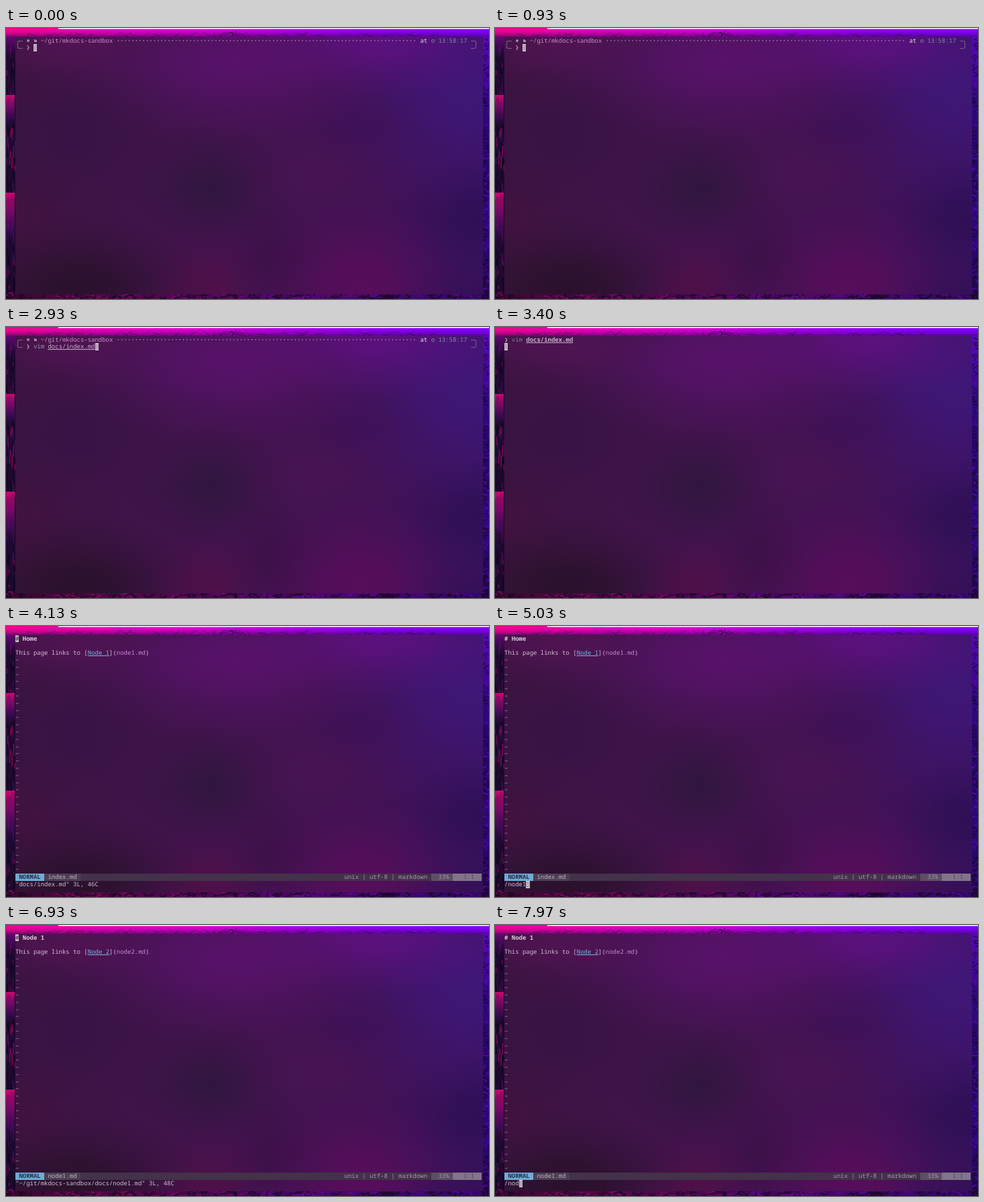
An HTML page with a canvas for the animation above (8 s loop, 720x405 px).

```html
<!DOCTYPE html>
<html lang="en">
<head>
<meta charset="utf-8">
<title>Terminal session</title>
<style>
  html, body { margin: 0; width: 100%; height: 100%; overflow: hidden; background: #1a0826; }
  canvas { position: absolute; left: 0; top: 0; }
  #term {
    position: absolute; left: 14px; top: 13.6px; width: 697px; height: 384px;
    font: 500 8.98px/10.8px "Noto Sans Mono", "DejaVu Sans Mono", monospace;
    text-rendering: geometricPrecision; font-variant-ligatures: none;
    color: #d0bfd1;
  }
  #term span { position: absolute; white-space: pre; height: 10.8px; }
  #term .bold { font-weight: 700; }
  #term .under { text-decoration: underline; text-underline-offset: 1px; text-decoration-thickness: 0.7px; text-decoration-skip-ink: none; }
  #term .bracket { box-sizing: border-box; height: 12px; border: 1px solid #75608a; }
  #term .open { border-right: 0; border-radius: 3px 0 0 3px; }
  #term .close { border-left: 0; border-radius: 0 3px 3px 0; }
  #term .cursor { background: #cfc3cf; color: #3a1740; }
  #term .empty::after { content: ""; position: absolute; inset: 2px 1px; border: 1px dotted #6b4a70; }
  #term .icon { background: #a088a8; }
</style>
</head>
<body>
<canvas id="wall" width="720" height="405"></canvas>
<div id="term"></div>
<script>
const LOOP = 8000, CELL = 5.388, ROW = 10.8;

// ---- wallpaper and blurred window ----
const ctx = document.getElementById('wall').getContext('2d');
let seed = 11;
const rnd = (lo = 0, hi = 1) => {
  seed = (seed * 16807) % 2147483647;
  return lo + (hi - lo) * seed / 2147483647;
};
const pick = list => list[Math.floor(rnd(0, list.length))];

function fill(color, x, y, w, h) {
  ctx.fillStyle = color;
  ctx.fillRect(x, y, w, h);
}

function gradient(x0, y0, x1, y1, colors) {
  const g = ctx.createLinearGradient(x0, y0, x1, y1);
  colors.forEach((c, i) => g.addColorStop(i / (colors.length - 1), c));
  return g;
}

function curl(x, y, r, color, width) {
  const start = rnd(0, 6.28);
  ctx.strokeStyle = color;
  ctx.lineWidth = width;
  ctx.beginPath();
  ctx.ellipse(x, y, r * rnd(0.8, 2), r * rnd(0.4, 1), rnd(-0.5, 0.5), start, start + rnd(1.5, 5));
  ctx.stroke();
}

function drawTop() {
  fill(gradient(0, 0, 720, 0, ['#f00590', '#e400b8', '#d800d0', '#a800e4', '#8a00f4', '#8000ff']), 0, 0, 720, 14);
  fill(gradient(0, 4, 0, 14, ['rgba(60,6,90,0)', 'rgba(60,6,90,.25)', 'rgba(60,6,90,.7)']), 0, 4, 720, 10);
  for (let i = 0; i < 100; i++) {
    const x = rnd(0, 640), lean = rnd(4, 16) * pick([-1, 1]);
    ctx.strokeStyle = pick(['rgba(58,5,80,.7)', 'rgba(92,6,120,.7)', 'rgba(37,6,56,.7)']);
    ctx.lineWidth = rnd(0.4, 0.9);
    ctx.beginPath();
    ctx.moveTo(x, 14);
    ctx.quadraticCurveTo(x + lean * 0.2, 10, x + lean, rnd(6, 11));
    ctx.stroke();
  }
  for (let i = 0; i < 8; i++) curl(rnd(306, 346), rnd(7, 13), rnd(2, 4), 'rgba(42,6,60,.8)', 1);
  fill('#fff', 78, 0, 642, 1.5);
}

function drawLeft() {
  fill('#1c0a2e', 0, 13, 14, 392);
  for (let i = 0; i < 230; i++) {
    fill(pick(['#140724', '#240a3c', '#321048', '#170826', '#120620', '#7c0850']),
      rnd(-1, 13), rnd(13, 400), rnd(0.8, 2), rnd(4, 20));
  }
  fill(gradient(0, 13, 0, 50, ['rgba(120,8,130,.8)', 'rgba(60,10,90,0)']), 0, 13, 14, 37);
  for (const [top, height] of [[100, 50], [246, 85]]) {
    fill(gradient(0, top, 0, top + height, ['#c8066e', '#8c0a72', 'rgba(76,12,100,.7)', 'rgba(40,10,60,0)']), 0, top, 13, height);
    for (let x = 0; x < 13; x += 2) {
      fill('rgba(28,8,50,.4)', x, top + rnd(2, 12), 1, height * rnd(0.5, 0.9));
    }
  }
}

function drawRight() {
  fill(gradient(0, 13, 0, 405, ['#5808b8', '#30087c', '#260868', '#30087c', '#1c0640']), 711, 13, 9, 392);
  for (let i = 0; i < 150; i++) {
    curl(rnd(711, 721), rnd(16, 400), rnd(1.5, 5), pick(['#120626', '#1c0838', '#5c08b8', '#3c0890']), rnd(0.6, 1.3));
  }
}

function drawBottom() {
  fill(gradient(0, 0, 720, 0, ['#34082c', '#580848', '#480850', '#500868', '#3c0868', '#300868']), 0, 397, 720, 8);
  for (let i = 0; i < 230; i++) {
    const x = rnd(0, 720);
    const bright = x < 350 ? '#8c0868' : '#620898';
    curl(x, rnd(397, 406), rnd(2, 6), pick(['#140520', '#1c0628', '#240830', bright]), rnd(0.7, 1.5));
  }
}

function glow(x, y, rx, ry, rgb, alpha) {
  ctx.save();
  ctx.translate(x, y);
  ctx.scale(rx, ry);
  const g = ctx.createRadialGradient(0, 0, 0, 0, 0, 1);
  for (const [stop, k] of [[0, 1], [0.3, 0.8], [0.6, 0.35], [1, 0]]) {
    g.addColorStop(stop, `rgba(${rgb},${alpha * k})`);
  }
  ctx.fillStyle = g;
  ctx.fillRect(-1, -1, 2, 2);
  ctx.restore();
}

function drawWindow() {
  ctx.save();
  ctx.beginPath();
  ctx.rect(14, 13, 697, 385);
  ctx.clip();
  fill(gradient(14, 0, 711, 0, ['#3b1440', '#3f1449', '#441351', '#421254', '#3a1260']), 14, 13, 697, 385);
  glow(340, 50, 270, 120, '94,18,114', 0.75);
  glow(90, 25, 170, 70, '88,20,88', 0.65);
  glow(690, 90, 230, 190, '64,24,126', 0.75);
  glow(560, 15, 200, 90, '100,16,136', 0.75);
  glow(110, 160, 150, 110, '54,18,70', 0.6);
  glow(310, 238, 130, 100, '44,22,58', 0.75);
  glow(530, 150, 100, 60, '60,16,86', 0.5);
  glow(460, 220, 150, 70, '74,20,84', 0.5);
  glow(700, 285, 110, 90, '40,14,80', 0.6);
  glow(110, 390, 190, 110, '38,16,38', 0.8);
  glow(20, 285, 90, 70, '72,16,62', 0.45);
  glow(400, 345, 80, 90, '58,16,70', 0.7);
  glow(300, 385, 90, 80, '84,14,70', 0.65);
  glow(530, 385, 150, 130, '92,12,92', 0.8);
  glow(700, 400, 100, 80, '48,14,80', 0.5);
  ctx.restore();
}

[drawTop, drawLeft, drawRight, drawBottom, drawWindow].forEach(draw => draw());

// ---- terminal screens ----
const cell = (col, row, text, color = '', cls = '', extra = '') =>
  `<span class="${cls}" style="left:${col * CELL}px;top:${row * ROW}px;color:${color};${extra}">${text}</span>`;

const bar = (col, width, color) =>
  cell(col, 33, '', '', '', `width:${width * CELL}px;background:${color}`);

const cursor = (col, row, char = '') =>
  cell(col, row, char, '', char ? 'cursor' : 'cursor empty', `width:${CELL}px`);

const icon = (x, y, w, h, radius) =>
  `<span class="icon" style="left:${x}px;top:${y}px;width:${w}px;height:${h}px;border-radius:${radius}"></span>`;

const bracket = (col, kind, width) =>
  `<span class="bracket ${kind}" style="left:${col * CELL}px;top:5px;width:${width * CELL}px"></span>`;

const command = (col, row, typed, dim) =>
  cell(col, row, typed.slice(0, 4), dim) +
  cell(col + 4, row, typed.slice(4), '#c4b2c8', row ? 'under' : 'under bold');

const prompt = typed =>
  bracket(0.5, 'open', 1.5) + bracket(126, 'close', 1.5) +
  icon(16.8, 3.7, 4, 4, '50%') +
  icon(27.5, 3.6, 2.5, 2, '0') + icon(27.5, 4.6, 4.5, 3, '0') +
  cell(7, 0, '~/git/mkdocs-sandbox', '#cb8cc6') +
  cell(28, 0, '·'.repeat(83), '#b296bc', 'bold') +
  cell(112, 0, 'at', '#e6dce8') +
  `<span style="left:620px;top:3.6px;width:3px;height:3px;border:1px solid #6f8c9c;border-radius:50%"></span>` +
  cell(117, 0, '13:58:17', '#78919f') +
  cell(3, 1, '❯', '#a9b3b4') +
  command(5, 1, typed, '#8fa3a0') +
  cursor(5 + typed.length, 1);

const launched =
  cell(0, 0, '❯', '#b3a9b8') + command(2, 0, 'vim docs/index.md', '#8b7c92') + cursor(0, 1);

const tildes = Array.from({ length: 30 }, (_, i) => cell(0, i + 3, '~', '#a58bb0')).join('');

function editor(file, title, next, message, mode = 'top') {
  const onLink = mode === 'link';
  const link = `node${next}.md`;
  const caret = { top: () => cursor(0, 0, '#'), link: () => cursor(28, 2, 'n'), search: () => cursor(message.length, 34) };
  return cell(0, 0, `# ${title}`, '#dccbdc', 'bold') +
    cell(0, 2, 'This page links to [') +
    cell(20, 2, `Node ${next}`, '#72b6dd', 'under') +
    cell(26, 2, '](') + cell(28, 2, link, '#cc86d2') + cell(28 + link.length, 2, ')') +
    tildes +
    bar(0, 129, '#43324a') + bar(8, 10, '#4d3f53') + bar(0, 8, '#70abd4') +
    bar(115, 6, '#5c4f63') + bar(121, 8, '#82758a') +
    cell(1, 33, 'NORMAL', '#24304c', 'bold') + cell(9, 33, file, '#bfb2c2') +
    cell(91, 33, 'unix | utf-8 | markdown', '#a799ab') +
    cell(116, 33, onLink ? '100%' : ' 33%', '#a194a6') +
    cell(124, 33, onLink ? '3:29' : '1:1', '#54475a') +
    cell(0, 34, message) + caret[mode]();
}

const home = (message, mode) => editor('index.md', 'Home', 1, message, mode);
const node = (message, mode) => editor('node1.md', 'Node 1', 2, message, mode);
const typeSearch = (page, times) =>
  times.map((t, i) => [t, page('/node1'.slice(0, i + 1), 'search')]);

const steps = [
  [0, prompt('')],
  [1830, prompt('v')], [1930, prompt('vi')], [2030, prompt('vim')], [2100, prompt('vim ')],
  [2200, prompt('vim d')], [2450, prompt('vim docs/')],
  [2700, prompt('vim docs/i')], [2900, prompt('vim docs/index.md')],
  [3270, launched],
  [3560, home('"docs/index.md" 3L, 46C')],
  ...typeSearch(home, [4370, 4480, 4580, 4680, 4790, 4930]),
  [5430, home('/node1', 'link')],
  [6270, node('"~/git/mkdocs-sandbox/docs/node1.md" 3L, 48C')],
  ...typeSearch(node, [7600, 7720, 7820, 7920])
];

const term = document.getElementById('term');
let shown = -1;
function frame() {
  const t = performance.now() % LOOP;
  const index = steps.findLastIndex(([start]) => start <= t);
  if (index !== shown) {
    term.innerHTML = steps[index][1];
    shown = index;
  }
  requestAnimationFrame(frame);
}
frame();
</script>
</body>
</html>
```
